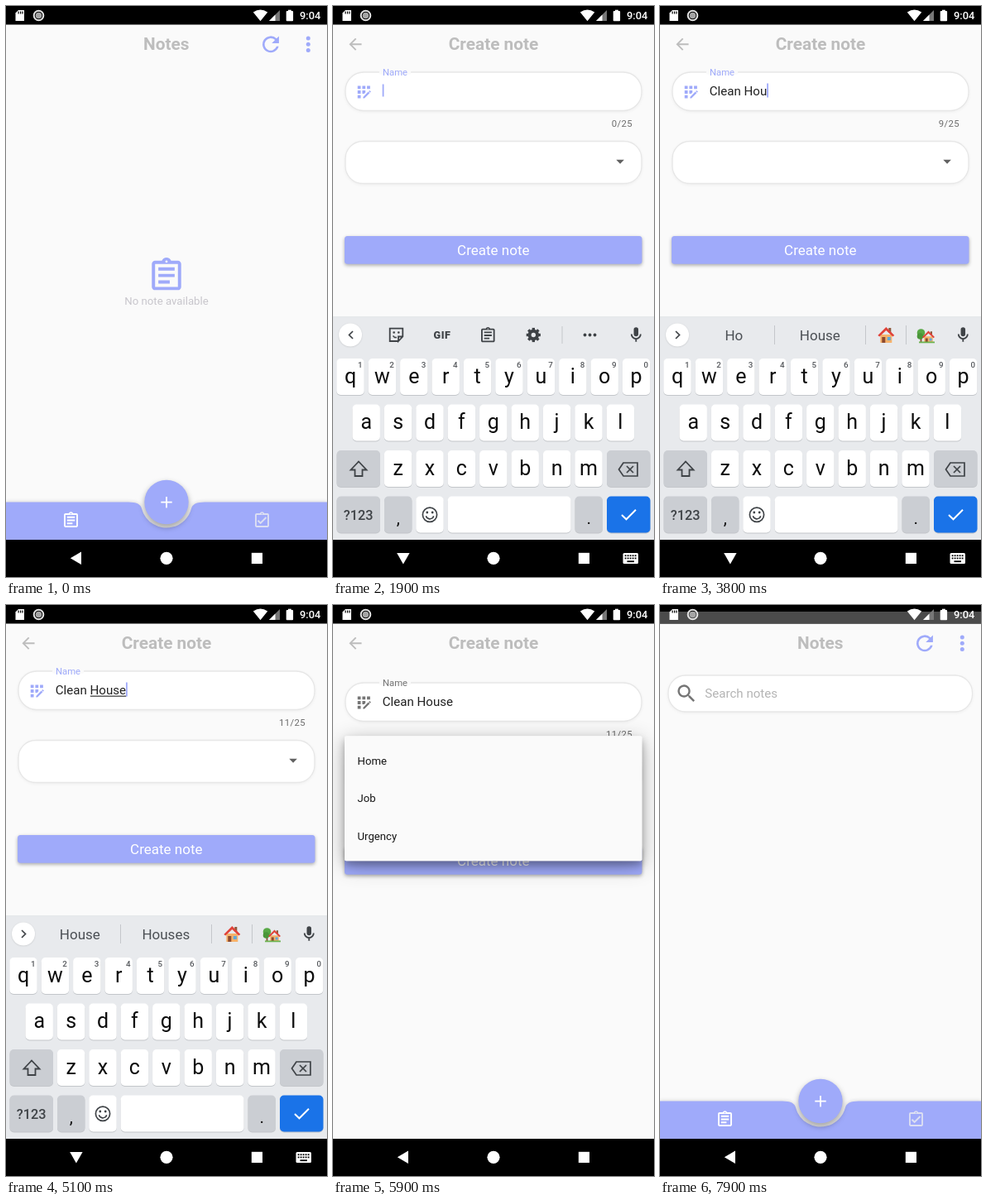
These frames come from a looping animation (388 by 690 pixels, 8000 ms). An HTML page with a canvas:

```html
<!DOCTYPE html>
<html lang="en">
<head>
<meta charset="utf-8">
<title>Notes</title>
<style>
html, body { margin: 0; width: 100%; height: 100%; overflow: hidden; background: #000; }
canvas { display: block; }
</style>
</head>
<body>
<canvas id="stage" width="388" height="690"></canvas>
<script>
const W = 388, H = 690, TOP = 22.5, NAV = 645, LOOP = 8000, STEP = 100;
const ACCENT = '#9faafa', PAPER = '#fafafa', GREY = '#757575', PALE = '#bdbdbd', INK = '#3f4347';
const screen = document.getElementById('stage').getContext('2d');
const buffer = Object.assign(document.createElement('canvas'), { width: W, height: H }).getContext('2d');
let g = screen;

// 24-unit icon outlines
const BOARD = 'M19 3h-4.18C14.4 1.84 13.3 1 12 1s-2.4.84-2.82 2H5c-1.1 0-2 .9-2 2v14c0 1.1.9 2 2 2h14c1.1 0 2-.9 2-2V5c0-1.1-.9-2-2-2zm-7-.25c.41 0 .75.34.75.75s-.34.75-.75.75-.75-.34-.75-.75.34-.75.75-.75zM19 19H5V5h14z';
const ICON = {
  notes: BOARD + 'M7 15h7v2H7zM7 11h10v2H7zM7 7h10v2H7z',
  tasks: BOARD + 'M16.6 7.6 10 14.2l-2.6-2.6L6 13l4 4 8-8z',
  refresh: 'M17.65 6.35A8 8 0 1 0 19.73 14h-2.08A6 6 0 1 1 16.22 7.78L13 11h7V4z',
  back: 'M20 11H7.83l5.59-5.59L12 4l-8 8 8 8 1.41-1.41L7.83 13H20z',
  form: 'M4 4h4v4H4zM10 4h4v4h-4zM16 4h4v4h-4zM4 10h4v4H4zM4 16h4v4H4zM14 12.4V10h-4v4h2.4zM20.9 11.3l-1.2-1.2h-.6l-.9.9L20 12.75l.9-.9zM11 18.25V20h1.75l6.67-6.67-1.75-1.75z',
  search: 'M15.5 14h-.79l-.28-.27A6.5 6.5 0 1 0 13.73 14.43l.27.28v.79l5 5L20.5 19zM9.5 14A4.5 4.5 0 1 1 9.5 5a4.5 4.5 0 0 1 0 9z',
  mic: 'M12 14a3 3 0 0 0 3-3V5a3 3 0 0 0-6 0v6a3 3 0 0 0 3 3zM17 11a5 5 0 0 1-10 0H5a7 7 0 0 0 6 6.9V21h2v-3.1A7 7 0 0 0 19 11z'
};
for (const name in ICON) ICON[name] = new Path2D(ICON[name]);

const clamp = v => Math.max(0, Math.min(1, v));
const ramp = (t, from, to) => clamp((t - from) / (to - from));
const easeOut = k => 1 - (1 - k) ** 3;
const latest = (list, t) => list.filter(e => e[0] <= t).pop();

function text(s, x, y, size, color, align = 'left', weight = 400, spacing = 0) {
  g.font = `${weight} ${size}px Roboto, sans-serif`;
  g.letterSpacing = spacing + 'px';
  g.textAlign = align;
  g.fillStyle = color;
  g.fillText(s, x, y);
}
function rect(x, y, w, h, color) { g.fillStyle = color; g.fillRect(x, y, w, h); }
function round(x, y, w, h, r, color) {
  g.beginPath(); g.roundRect(x, y, w, h, r); g.fillStyle = color; g.fill();
}
function disc(x, y, r, color) {
  g.beginPath(); g.arc(x, y, r, 0, 7); g.fillStyle = color; g.fill();
}
function ring(x, y, r, width, color) {
  g.beginPath(); g.arc(x, y, r, 0, 7); g.lineWidth = width; g.strokeStyle = color; g.stroke();
}
function trace(points) {
  g.beginPath();
  points.forEach(([x, y]) => g.lineTo(x, y));
}
function poly(color, ...points) { trace(points); g.fillStyle = color; g.fill(); }
function line(color, width, ...points) {
  trace(points); g.lineWidth = width; g.strokeStyle = color; g.stroke();
}
function icon(name, x, y, scale, color) {
  g.save();
  g.translate(x - 12 * scale, y - 12 * scale);
  g.scale(scale, scale);
  g.fillStyle = color;
  g.fill(ICON[name], 'evenodd');
  g.restore();
}
function shadowed(alpha, blur, dy, draw) {
  g.save();
  g.shadowColor = `rgba(0,0,0,${alpha})`;
  g.shadowBlur = blur;
  g.shadowOffsetY = dy;
  draw();
  g.restore();
}
function pill(x, y, w, h, r) {
  shadowed(.07, 4, 1, () => round(x, y, w, h, r, '#fff'));
  g.beginPath(); g.roundRect(x, y, w, h, r);
  g.lineWidth = 1.3; g.strokeStyle = '#e7e7e7'; g.stroke();
}
function layer(draw, alpha, dy) {
  g = buffer;
  draw();
  g = screen;
  g.globalAlpha = alpha;
  g.drawImage(buffer.canvas, 0, dy);
  g.globalAlpha = 1;
}

function bottomBar() {
  const c = 194, y = 599.5, r = 31;
  shadowed(.12, 4, -1, () => {
    g.beginPath();
    g.moveTo(0, y); g.lineTo(c - 46, y);
    g.quadraticCurveTo(c - 32, y, c - 30.1, y + 7.4);
    g.arc(c, y, r, Math.PI - .242, .242, true);
    g.quadraticCurveTo(c + 32, y, c + 46, y);
    g.lineTo(W, y); g.lineTo(W, NAV); g.lineTo(0, NAV);
    g.fillStyle = ACCENT; g.fill();
  });
  icon('notes', 78.5, 621.5, .94, '#fff');
  icon('tasks', 309.5, 621.5, .94, '#dcdff2');
  shadowed(.36, 7, 3.5, () => disc(c, y, 26.7, ACCENT));
  rect(187.3, 598.7, 13.4, 1.8, '#fff');
  rect(193.1, 593, 1.8, 13.4, '#fff');
}

function notesPage(t) {
  rect(0, TOP, W, NAV - TOP, PAPER);
  text('Notes', 193.7, 53, 20.8, PALE, 'center', 700);
  icon('refresh', 320, 46.3, 1.24, ACCENT);
  for (const y of [39, 46.2, 53.4]) disc(365.3, y, 2.5, ACCENT);
  if (t < 4000) {
    icon('notes', 194, 325.6, 1.97, ACCENT);
    g.globalAlpha = .6 + .4 * ramp(t, 0, 500);
    text('No note available', 194, 361, 13.2, '#a6a4ae', 'center');
    g.globalAlpha = 1;
  } else {
    pill(10, 85, 367.5, 44, 21);
    icon('search', 32, 107, 1.18, GREY);
    text('Search notes', 54.3, 112, 15.1, '#b4b4b4');
  }
  bottomBar();
}

const typed = [[0, ''], [2500, 'C'], [2700, 'Cl'], [2800, 'Cle'], [2900, 'Clea'], [3000, 'Clean'],
  [3200, 'Clean '], [3400, 'Clean H'], [3600, 'Clean Ho'], [3800, 'Clean Hou'], [3900, 'Clean Hous'],
  [4000, 'Clean House']];
const hints = [[0], [2600, 'C', 'Can', 'Call'], [2900, 'Clean', 'Clear', 'Cleaning'],
  [3100, 'the', 'up', 'and'], [3700, 'Ho', 'House'], [4100, 'House', 'Houses']];
const caretOn = t => t < 2100 || (t >= 2500 && t < 4600) || t >= 5100;

function nameField(t, dy) {
  const y = 94 + dy, focused = t >= 1600 && t < 5600, tint = focused ? ACCENT : GREY;
  const lift = easeOut(ramp(t, 1500, 1800)), value = latest(typed, t)[1];
  pill(15, y, 358, 46.5, 22);
  icon('form', 37.3, y + 24, .944, tint);
  if (lift > .8) rect(56, y - 3, 38, 5.5, PAPER);
  text('Name', 60, y + 28 - 23.8 * lift, 15.1 - 3.8 * lift, tint);
  text(`${value.length}/25`, 362, y + 65.6, 11.3, '#6c6c6c', 'right', 400, .4);
  text(value, 59.8, y + 28, 15.1, '#212121');
  const end = 60 + g.measureText(value).width;
  if (focused && t >= 4100) {
    const start = 60 + g.measureText('Clean ').width;
    rect(start, y + 29.6, end - start, 1.1, '#212121');
  }
  if (focused && caretOn(t)) rect(end - .3, y + (value ? 13.5 : 1.5 + 13), 1.8, value ? 17 : 15, ACCENT);
}

function menu(t) {
  const k = ramp(t, 5600, 5900);
  if (!k || t >= 7000) return;
  const top = 158.3, height = 45 + 106 * easeOut(k);
  g.globalAlpha = clamp(k * 2.5);
  const panel = () => round(14, top, 359.5, height, 2, PAPER);
  shadowed(.3, 26, 6, panel);
  shadowed(.25, 8, 5, panel);
  ['Home', 'Job', 'Urgency'].forEach((label, i) => {
    g.globalAlpha = clamp(k * 4 - i - .4);
    text(label, 29.5, 193 + i * 45.4, 13.2, '#161616');
  });
  g.globalAlpha = 1;
}

function createPage(t, raised) {
  const dy = -14 * raised;
  rect(0, TOP, W, NAV - TOP, PAPER);
  icon('back', 27, 46.3, .944, PALE);
  text('Create note', 194, 53, 20.8, PALE, 'center', 700);
  nameField(t, dy);
  pill(15, 177.5 + dy, 358, 51, 21);
  poly('#616161', [342.3, 199.7 + dy], [351.9, 199.7 + dy], [347.1, 204.7 + dy]);
  if (t >= 7000) text('Home', 29.5, 207 + dy, 13.2, '#161616');
  shadowed(.32, 4, 1.7, () => round(14, 292 + dy, 359.5, 33.8, 3.5, ACCENT));
  text('Create note', 193.8, 315 + dy, 17, '#fff', 'center');
  menu(t);
}

function house(x, y, size) {
  const s = size / 20;
  rect(x - 7 * s, y - 1 * s, 14 * s, 10 * s, '#f6b26b');
  rect(x + 3 * s, y - 9 * s, 3 * s, 6 * s, '#8d5a3c');
  poly('#e0433a', [x - 10 * s, y], [x, y - 10 * s], [x + 10 * s, y], [x + 8 * s, y + 1.5 * s], [x, y - 6 * s], [x - 8 * s, y + 1.5 * s]);
  rect(x - 5 * s, y + 2 * s, 4 * s, 7 * s, '#8d4a2f');
  rect(x + 1.5 * s, y + 2 * s, 4 * s, 4 * s, '#5fa8dc');
}

function toolStrip() {
  line(INK, 1.7, [24, 393], [19.5, 397.5], [24, 402]);
  line(INK, 1.8, [79, 405], [68.7, 405], [68.7, 389.7], [84.3, 389.7], [84.3, 399.5], [79, 405], [79, 399.5], [84.3, 399.5]);
  disc(73.7, 394.5, 1.3, INK); disc(79.3, 394.5, 1.3, INK);
  line(INK, 1.6, [72.5, 398.5], [74.5, 400.5], [77, 400.5]);
  text('GIF', 132, 402.3, 12.6, INK, 'center', 900, .5);
  icon('notes', 187.3, 398, .92, INK);
  ring(242.3, 397.5, 4.7, 4, INK);
  for (let i = 0; i < 8; i++) {
    const a = i * Math.PI / 4, c = Math.cos(a), s = Math.sin(a);
    line(INK, 3.4, [242.3 + 5 * c, 397.5 + 5 * s], [242.3 + 8.6 * c, 397.5 + 8.6 * s]);
  }
  rect(276.5, 387, 1, 21, '#c4c7cb');
  for (const x of [304.5, 310.5, 316.5]) disc(x, 397.5, 1.9, INK);
}

function hintStrip([, first, second, third]) {
  line(INK, 1.7, [19, 393], [23.5, 397.5], [19, 402]);
  for (const x of [138, 248]) rect(x, 386, 1, 23, '#c4c7cb');
  text(first, 89.3, 404, 17, '#4b4f54', 'center');
  text(second, 193.3, 404, 17, '#4b4f54', 'center');
  if (third) { text(third, 300, 404, 17, '#4b4f54', 'center'); return; }
  rect(297, 386, 1, 23, '#c4c7cb');
  house(273.3, 398, 20);
  rect(314.5, 400, 2, 7, '#8d5a3c');
  disc(315.5, 395, 4.8, '#58a846');
  disc(314.5, 399, 3.8, '#4a9639');
  house(324.5, 400, 15);
  rect(313, 405.5, 19, 1.8, '#6cb34f');
}

function key(x, y, w, color = '#fff') {
  round(x, y + 1, w, 44, 5, '#c3c6ca');
  round(x, y, w, 44, 5, color);
}
function letterRow(letters, x, y, digits) {
  [...letters].forEach((ch, i) => {
    const c = x + i * 38.4;
    key(c - 16.7, y, 33.4);
    text(ch, c, y + 29.7, 25, '#0c0c0c', 'center');
    if (digits) text((i + 1) % 10, c + 11.7, y + 11, 9.8, '#55585c', 'center', 500);
  });
}

function keyboard(t, raised) {
  if (!raised) return;
  const dark = '#cbced3', hint = latest(hints, t);
  g.save();
  g.translate(0, 269 * (1 - raised));
  rect(0, 376, W, 269, '#e8eaed');
  rect(0, 375.3, W, .8, '#dfe1e4');
  shadowed(.15, 2, .5, () => disc(21, 397.5, 14, '#fff'));
  hint.length > 1 ? hintStrip(hint) : toolStrip();
  icon('mic', 366.3, 397.5, .92, INK);
  letterRow('qwertyuiop', 21, 426, true);
  letterRow('asdfghjkl', 40.2, 481.5);
  letterRow('zxcvbnm', 78.6, 537);

  key(4.5, 537, 52.5, dark);
  line(INK, 1.8, [31, 550.5], [21.5, 560.5], [26.5, 560.5], [26.5, 568], [35.5, 568], [35.5, 560.5], [40.5, 560.5], [31, 550.5], [30, 551.5]);
  key(331, 537, 52.5, dark);
  line(INK, 1.7, [345.5, 560], [351, 552], [368, 552], [368, 568], [351, 568], [345.5, 560], [351, 552]);
  line(INK, 1.7, [355, 556], [363, 564]);
  line(INK, 1.7, [363, 556], [355, 564]);

  key(4.5, 592.5, 52.5, dark);
  text('?123', 30.7, 621, 16.3, INK, 'center', 500);
  key(62, 592.5, 33.4, dark);
  text(',', 78.7, 626, 21, '#111', 'center');
  key(100.3, 592.5, 33.4);
  ring(117, 614.7, 8.6, 1.7, INK);
  disc(113.8, 612, 1.4, INK); disc(120.2, 612, 1.4, INK);
  g.beginPath(); g.arc(117, 615, 4.8, .25, Math.PI - .25); g.lineWidth = 1.7; g.stroke();
  key(138.7, 592.5, 148.8);
  key(292.5, 592.5, 33.4, dark);
  text('.', 309.2, 626, 21, '#111', 'center');
  key(331, 592.5, 52.5, '#1a73e8');
  line('#fff', 2, [349, 615], [354.5, 620.3], [366, 608.8]);
  g.restore();
}

function statusBar(t) {
  rect(0, 0, W, TOP, '#000');
  const glow = ramp(t, 7600, 7900);
  if (glow) {
    g.globalAlpha = glow;
    rect(0, 8, W, TOP - 8, '#4b4b4b');
    g.globalAlpha = 1;
  }
  poly('#fff', [15, 5], [22, 5], [22, 18], [11.5, 18], [11.5, 8.5]);
  for (const x of [14.5, 17, 19.4]) rect(x, 6.5, 1.2, 3, '#000');
  ring(39.5, 11.5, 5.8, 2, '#e4e4e4');
  disc(39.5, 11.5, 3.8, '#a5a5a5');
  g.beginPath();
  g.moveTo(307.5, 18.3); g.lineTo(298.8, 7.6);
  g.quadraticCurveTo(307.5, 1.5, 316.2, 7.6);
  g.fillStyle = '#fff'; g.fill();
  poly('#777', [331, 5], [331, 18], [318, 18]);
  poly('#fff', [325.5, 10.5], [325.5, 18], [318, 18]);
  round(338.7, 6, 8.4, 12.3, 1, '#fff');
  rect(341, 4.7, 3.8, 2, '#fff');
  text('9:04', 380.3, 16.2, 12.9, '#fff', 'right', 500);
}

function navBar(typing) {
  rect(0, NAV, W, H - NAV, '#000');
  disc(194, 667.3, 7.6, '#fff');
  rect(296.8, 660.8, 13.2, 13.2, '#fff');
  if (!typing) { poly('#fff', [77.8, 667.3], [91, 659.6], [91, 675]); return; }
  poly('#fff', [77.2, 661], [92.6, 661], [84.9, 674.6]);
  round(350.5, 661, 18.5, 13, 1.5, '#fff');
  for (let i = 0; i < 5; i++) {
    rect(352.7 + i * 3, 663.3, 1.8, 1.8, '#000');
    rect(352.7 + i * 3, 666.5, 1.8, 1.8, '#000');
  }
  rect(355.5, 670.3, 8.5, 1.8, '#000');
}

function draw(t) {
  const opening = ramp(t, 700, 1100), closing = ramp(t, 7600, 7900);
  const raised = t < 5000 ? easeOut(ramp(t, 1500, 1900)) : 1 - ramp(t, 5500, 5700);
  rect(0, 0, W, H, PAPER);
  if (opening < 1 || closing > 0) notesPage(t);
  if (opening > 0 && closing < 1) {
    const shown = t < 4000 ? opening : 1 - closing;
    layer(() => createPage(t, raised), shown * shown, 155 * (1 - easeOut(shown)));
  }
  keyboard(t, raised);
  statusBar(t);
  navBar(raised > .4);
}

function tick() {
  draw(Math.floor(performance.now() % LOOP / STEP) * STEP);
  requestAnimationFrame(tick);
}
tick();
</script>
</body>
</html>
```
